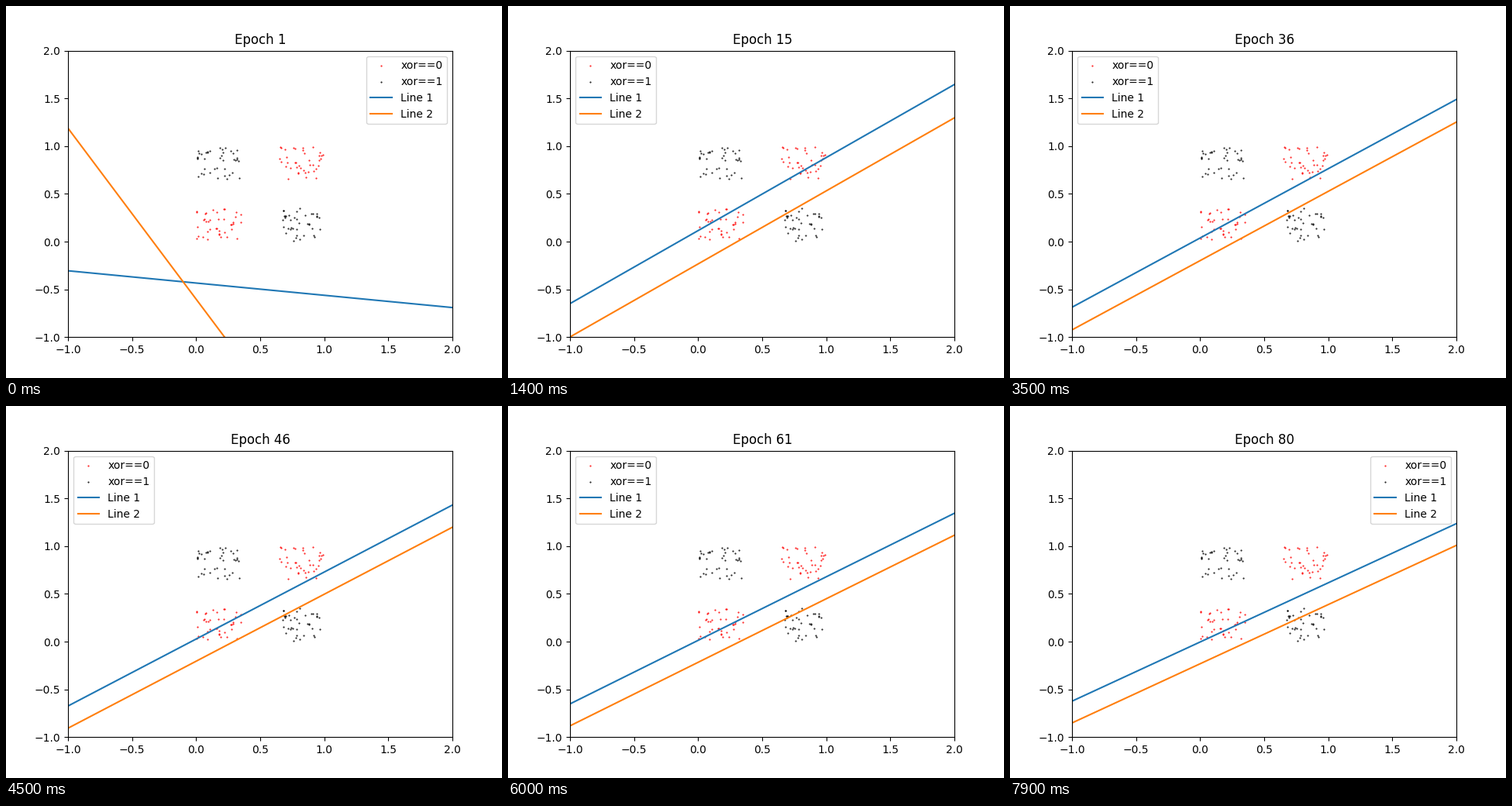
A matplotlib script for the animation above (8 s loop, 640 px wide and 480 px high).

```python
import numpy as np
import matplotlib.pyplot as plt
from matplotlib.animation import FuncAnimation

EPOCHS = 80
INTERVAL = 100
PER_SQUARE = 40
SIDE = .35

rng = np.random.default_rng(7)


def square(a, b):
    """Random samples near the unit-square corner (a, b)."""
    corner = (1 - SIDE) * np.array([[a], [b]])
    return corner + rng.uniform(0, SIDE, (2, PER_SQUARE))


def fade(epoch, tau):
    return np.exp(-(epoch - 1) / tau)


def drift(epoch, final, rate):
    """Slow linear trend that reaches its final value at the last epoch."""
    return final + rate * (EPOCHS - epoch)


def line_params(epoch):
    """Slope and intercept of both lines: a slow drift plus fast transients."""
    slope = drift(epoch, .620, .0024)
    slope_1 = slope - .938 * fade(epoch, 3.15)
    slope_2 = slope - 2.60 * fade(epoch, 2.56)
    shift_1 = (drift(epoch, -.004, .0009)
               + .58 * fade(epoch, 6.4) - 1.081 * fade(epoch, 2.5))
    shift_2 = drift(epoch, -.232, .0008) - .434 * fade(epoch, 6.7)
    return (slope_1, shift_1), (slope_2, shift_2)


fig, ax = plt.subplots(figsize=(6.4, 4.8), dpi=100)
ax.set(xlim=(-1, 2), ylim=(-1, 2))

for value, color in ((0, "red"), (1, "black")):
    x, y = np.hstack([square(a, a ^ value) for a in (0, 1)])
    ax.scatter(x, y, s=1, marker=".", color=color, label=f"xor=={value}")

ends = np.array([-1, 2])
lines = [ax.plot(ends, ends, label=f"Line {n}")[0] for n in (1, 2)]


def update(frame):
    epoch = frame + 1
    for line, (slope, shift) in zip(lines, line_params(epoch)):
        line.set_ydata(slope * ends + shift)
    ax.set_title(f"Epoch {epoch}")
    ax.legend(loc="best")


anim = FuncAnimation(fig, update, frames=EPOCHS, interval=INTERVAL,
                     init_func=lambda: update(0), repeat=True, repeat_delay=0)
plt.show()
```
